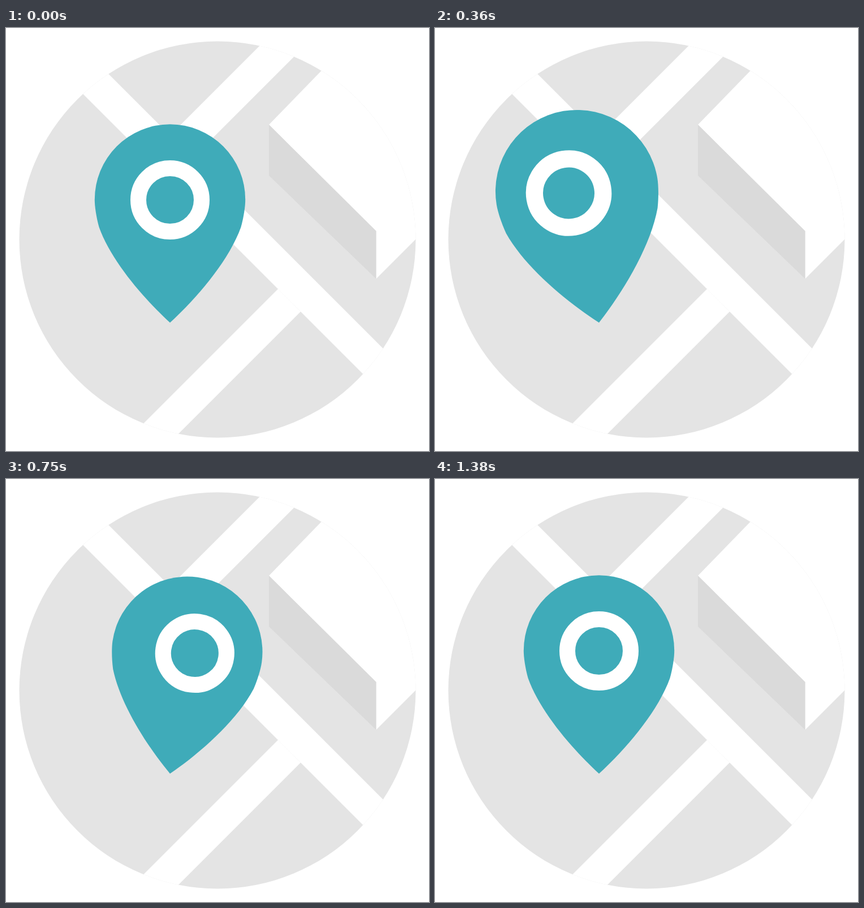
Write an HTML page that moves like this. It is 748 px wide and 748 px high and loops after 1410 ms.

```html
<!DOCTYPE html>
<html lang="en">
<head>
<meta charset="utf-8">
<title>Map pin</title>
<style>
  html, body { margin: 0; width: 100%; height: 100%; overflow: hidden; background: #fff; }
  svg { display: block; width: 100vw; height: 100vh; }
</style>
</head>
<body>
<svg viewBox="0 0 748 748">
  <clipPath id="disc"><circle cx="374" cy="374" r="350.5"/></clipPath>
  <circle cx="374" cy="374" r="350.5" fill="#e4e4e4"/>
  <g clip-path="url(#disc)" fill="#fff">
    <path d="M100 0L748 648V728.5L19.5 0Z"/>
    <path d="M480 0H560L330 230L290 190Z"/>
    <path d="M481 461.5L521 501.5L274.5 748H194.5Z"/>
    <path d="M465 171L636 -5H748V350L654.5 443.5V359Z"/>
    <path d="M465 171L654.5 359V443.5L465 261Z" fill="#dadada"/>
  </g>
  <g id="pin">
    <path fill="#3fabb9" d="M0 0C-47 -43 -104 -109 -125.5 -169C-130.5 -187 -133.2 -206 -133.2 -217.5A133.2 133.2 0 0 1 133.2 -217.5C133.2 -206 130.5 -187 125.5 -169C104 -109 47 -43 0 0Z"/>
    <circle id="ring" cy="-217" r="56" fill="none" stroke="#fff" stroke-width="28"/>
  </g>
</svg>
<script>
  const STEP = 30, STEPS = 47;
  const pin = document.getElementById('pin');
  const ring = document.getElementById('ring');

  // Keyframes are [step, value] pairs.
  const scaleKeys = [[0, 1], [9, 1.1], [20, 1]];
  const angleKeys = [[2.8, 0], [11, -10], [22, 10], [33.6, -2], [42, 0.1], [46, 0]];
  const ringKeys = [[1.5, 0], [13, -14], [24, 14], [35.8, 0]];

  function valueAt(keys, time) {
    const next = keys.findIndex(([at]) => at > time);
    if (next === 0) return keys[0][1];
    if (next < 0) return keys[keys.length - 1][1];
    const [t0, v0] = keys[next - 1], [t1, v1] = keys[next];
    const p = (time - t0) / (t1 - t0);
    return v0 + (v1 - v0) * p * p * (3 - 2 * p);
  }

  function draw() {
    const time = Math.floor(performance.now() / STEP) % STEPS;
    const angle = valueAt(angleKeys, time), scale = valueAt(scaleKeys, time);
    pin.setAttribute('transform', `translate(290 521) rotate(${angle}) scale(${scale})`);
    ring.setAttribute('cx', valueAt(ringKeys, time));
    requestAnimationFrame(draw);
  }
  draw();
</script>
</body>
</html>
```
